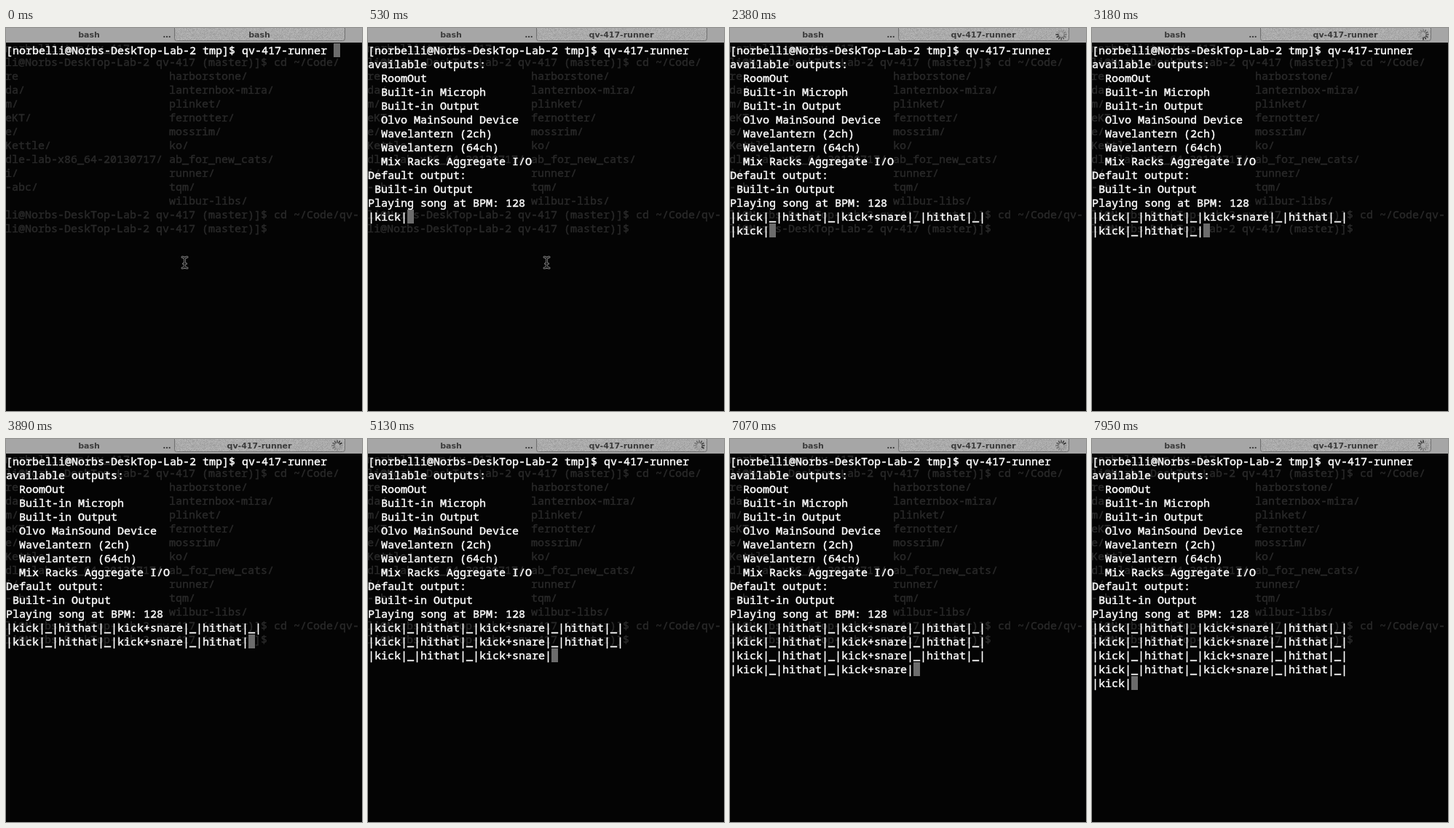
Animation of 489 by 525 pixels, one loop 8000 ms. Source, as an HTML page with a canvas:

```html
<!DOCTYPE html>
<html lang="en">
<head>
<meta charset="utf-8">
<title>Terminal drum machine</title>
<style>
  html, body { margin: 0; width: 100%; height: 100%; overflow: hidden; background: #040404; }
  canvas { display: block; }
</style>
</head>
<body>
<canvas id="stage" width="489" height="525"></canvas>
<script>
const ctx = document.getElementById('stage').getContext('2d');
const LOOP = 8000, COL = 9, ROW = 19, TOP = 21;
const ENTER = 350, OUTPUT = 524, POINTER_HIDES = 1400, TICK = 88.33;
const FIRST_BEAT = 477, BEAT = 231.7;
const MONO = '500 15px "Noto Sans Mono", monospace';
const TITLE = 'bold 11px "DejaVu Sans", sans-serif';

const prompt = '[norbelli@Norbs-DeskTop-Lab-2 tmp]$ qv-417-runner';
const report = [
  'available outputs:',
  '  RoomOut',
  '  Built-in Microph',
  '  Built-in Output',
  '  Olvo MainSound Device',
  '  Wavelantern (2ch)',
  '  Wavelantern (64ch)',
  '  Mix Racks Aggregate I/O',
  'Default output:',
  ' Built-in Output',
  'Playing song at BPM: 128'
];
const pattern = ['kick', '_', 'hithat', '_', 'kick+snare', '_', 'hithat', '_'];

const behindPrompt = 'li@Norbs-DeskTop-Lab-2 qv-417 (master)]$';
const listing = [
  ['re', 'harborstone/'],
  ['da/', 'lanternbox-mira/'],
  ['m/', 'plinket/'],
  ['eKT/', 'fernotter/'],
  ['e/', 'mossrim/'],
  ['Kettle/', 'ko/'],
  ['dle-lab-x86_64-20130717/', 'ab_for_new_cats/'],
  ['i/', 'runner/'],
  ['-abc/', 'tqm/'],
  ['', 'wilbur-libs/']
];
const behind = [
  'norbelli/tmp/qv_417',
  behindPrompt + ' cd ~/Code/',
  ...listing.map(([left, right]) => left.padEnd(25) + right),
  behindPrompt + ' cd ~/Code/qv-',
  behindPrompt
];

// A thin outline gives the text its medium weight
function drawLines(lines, x, baseline, color) {
  ctx.font = MONO;
  ctx.textAlign = 'left';
  ctx.fillStyle = ctx.strokeStyle = color;
  ctx.lineWidth = 0.45;
  lines.forEach((line, i) => {
    ctx.fillText(line, x, baseline + i * ROW);
    ctx.strokeText(line, x, baseline + i * ROW);
  });
}

function drawTitle(text, x) {
  ctx.font = TITLE;
  ctx.textAlign = 'center';
  ctx.fillStyle = '#3c3c3c';
  ctx.fillText(text, x, 13);
}

// Seeded grain for the active tab
function makeGrain(width, height) {
  const grain = document.createElement('canvas');
  grain.width = width;
  grain.height = height;
  const g = grain.getContext('2d');
  let seed = 7;
  for (let i = 0; i < width * height; i++) {
    seed = (seed * 16807) % 2147483647;
    const shade = 158 + seed % 26;
    g.fillStyle = `rgb(${shade},${shade},${shade})`;
    g.fillRect(i % width, Math.floor(i / width), 1, 1);
  }
  return grain;
}
const grain = makeGrain(235, 18);

function drawTabs(running) {
  ctx.fillStyle = '#a6a6a6';
  ctx.fillRect(0, 0, 489, 20);
  ctx.save();
  ctx.beginPath();
  ctx.roundRect(231.5, -4, 234, 21.5, 3);
  ctx.clip();
  ctx.drawImage(grain, 231, 0);
  ctx.restore();
  ctx.strokeStyle = '#707070';
  ctx.lineWidth = 1;
  ctx.stroke();
  drawTitle('bash', 114);
  drawTitle('…', 221);
  drawTitle(running ? 'qv-417-runner' : 'bash', 348);
}

function drawSpinner(tick) {
  ctx.save();
  ctx.translate(455, 9);
  ctx.lineWidth = 1.5;
  ctx.lineCap = 'round';
  for (let i = 0; i < 12; i++) {
    const age = (tick - i + 12) % 12;
    ctx.strokeStyle = `rgba(30,30,30,${Math.max(0.15, 0.9 - age * 0.085)})`;
    ctx.save();
    ctx.rotate(i * Math.PI / 6);
    ctx.beginPath();
    ctx.moveTo(0, -4);
    ctx.lineTo(0, -7);
    ctx.stroke();
    ctx.restore();
  }
  ctx.restore();
}

function drawPointer() {
  const shape = new Path2D('M242 314 Q245.5 314 245.5 317 V326 Q245.5 329 242 329' +
    ' M249 314 Q245.5 314 245.5 317 M249 329 Q245.5 329 245.5 326 M243.5 323 H247.5');
  ctx.lineCap = 'round';
  for (const [width, color] of [[3, '#808080'], [1.2, '#080808']]) {
    ctx.lineWidth = width;
    ctx.strokeStyle = color;
    ctx.stroke(shape);
  }
}

function songLines(beats) {
  const lines = [];
  for (let i = 0; i < beats; i++) {
    if (i % 8 === 0) lines.push('|');
    lines[lines.length - 1] += pattern[i % 8] + '|';
  }
  return lines;
}

function terminalLines(time, tick) {
  if (time < ENTER) return [prompt + ' '];
  if (tick < 0) return [prompt, ''];
  const shownAt = OUTPUT + 6 + tick * TICK;
  const beats = Math.floor((shownAt - FIRST_BEAT) / BEAT) + 1;
  return [prompt, ...report, ...songLines(beats)];
}

function draw(time) {
  const tick = Math.floor((time - OUTPUT) / TICK);
  const lines = terminalLines(time, tick);
  const row = lines.length - 1;

  ctx.fillStyle = '#040404';
  ctx.fillRect(0, 0, 489, 525);
  drawLines(behind, -1, 33, '#292929');
  drawTabs(tick >= 0);
  if (tick >= 3) drawSpinner(tick);

  ctx.fillStyle = '#6c6c6c';
  ctx.fillRect(lines[row].length * COL, TOP + row * ROW, COL, ROW);
  drawLines(lines, 0, TOP + 15, '#fff');
  if (time < POINTER_HIDES) drawPointer();
}

const start = performance.now();
function frame() {
  draw((performance.now() - start) % LOOP);
  requestAnimationFrame(frame);
}
frame();
</script>
</body>
</html>
```
